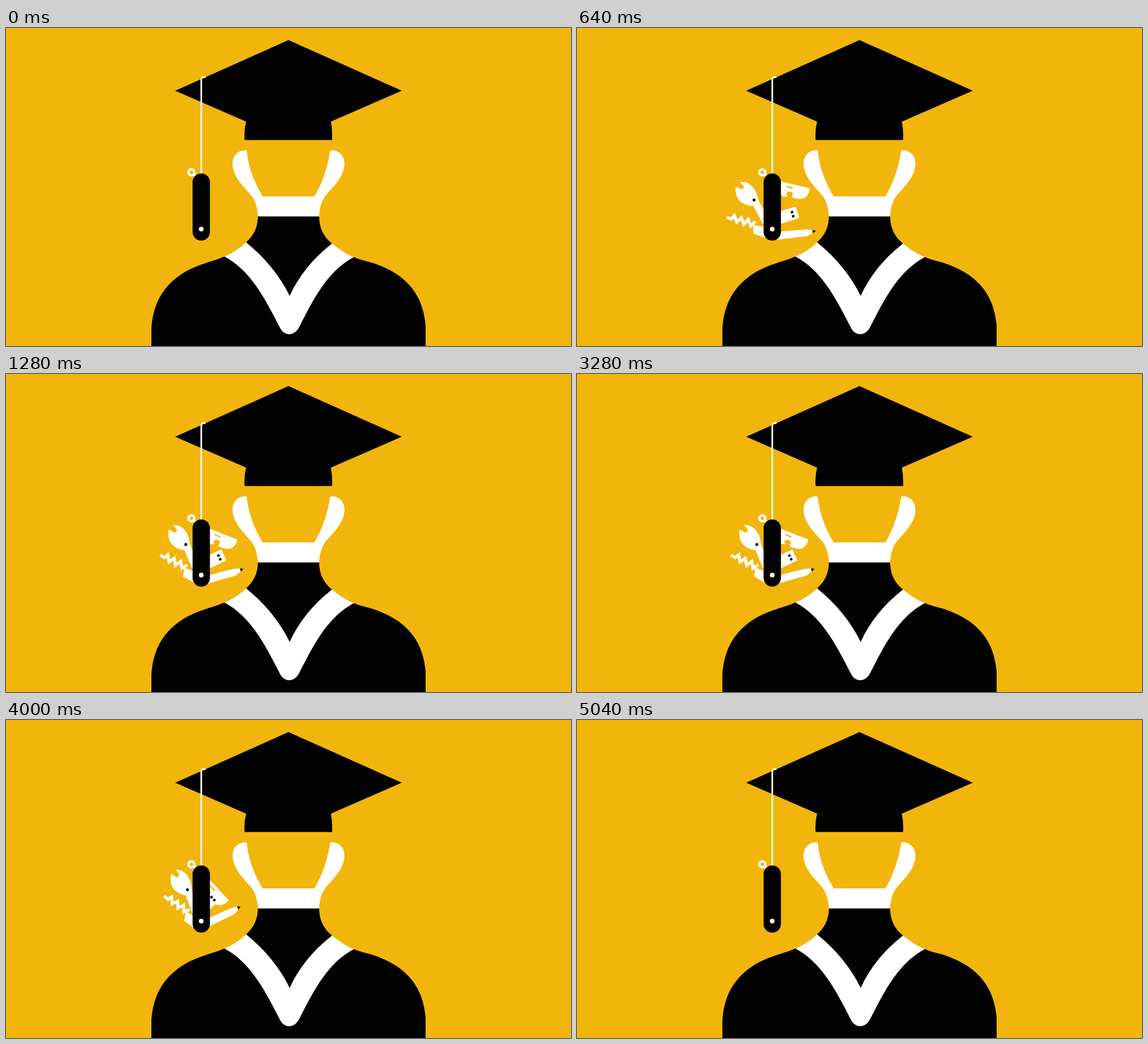
Animation of 960x540 px, one loop 5.54 s. Source, as an HTML page:

```html
<!DOCTYPE html>
<html lang="en">
<head>
<meta charset="utf-8">
<title>Graduate with pocket knife tassel</title>
<style>
  html, body { margin: 0; width: 100%; height: 100%; overflow: hidden; background: #f2b50c; }
  svg { display: block; width: 100%; height: 100%; }
  .w { fill: #fff; }
  .k { fill: #020201; }
  .line { fill: none; stroke: #fff; }
</style>
</head>
<body>
<svg viewBox="0 0 960 540">
  <rect width="960" height="540" fill="#f2b50c"/>

  <!-- gown, neck, collar, head -->
  <path class="k" d="M371 388C360 393 348 396 340 399C300 411 250 440 247 512V540H713V505C708 440 665 412 620 398C610 395 600 393 591 389Z"/>
  <path class="k" d="M428 319H532C532 340 540 355 554 366L482 458L408 364C420 353 428 340 428 319Z"/>
  <path class="w" d="M408 364C440 390 465 420 482 455C498 420 523 390 554 366C565 375 578 384 591 389C548 412 525 455 498 508C490 524 472 524 465 508C438 455 414 411 371 388C385 382 398 374 408 364Z"/>
  <path class="w" d="M409 208C396 206 384 216 385 232C386 252 402 268 413 280C421 288 427 300 428 320H532C533 300 539 288 547 280C558 268 574 252 575 232C576 216 564 206 551 208C546 238 538 262 524 286H436C422 262 412 238 409 208Z"/>

  <!-- cap -->
  <path class="k" d="M480 20.500L672.500 106.500L552 159Q555 174 554 190.300H405.500Q404 174 408 159L287.500 106.500Z"/>
  <path class="line" style="stroke:#fffbe8" stroke-width="2.800" d="M339 83.500H335.500Q331.800 83.500 331.800 88V250"/>

  <!-- tools, drawn in their resting pose -->
  <g id="blade">
    <path class="w" d="M331 257L393 281C391 291 384 298 375 297L364 294L361 291L364 285L358 281L352 284L354 289L347 289L333 275Z"/>
    <path d="M354 272.500L364.500 277" stroke="#f2b50c" stroke-width="2.400"/>
  </g>
  <g id="stick">
    <path class="w" d="M366 298L374.500 316.500L340 333L331 314Z"/>
    <g transform="rotate(-25 362.500 311.500)">
      <path class="k" d="M360.500 306h4v4h-4zM360.500 313h4v4h-4z"/>
    </g>
  </g>
  <g id="pencil">
    <path class="w" d="M331 345L386 331L398 330L399 335L391 342L331 359Z"/>
    <path class="k" d="M397.500 330L403.500 331L399 335.500Z"/>
  </g>
  <g id="corkscrew">
    <path class="line" stroke-width="5" d="M262 307.500L269 312L275 307L277 319L286 313L288 325L297 318L299 330L308 324"/>
    <path class="w" d="M303 329L322 336V356L301 344Z"/>
  </g>
  <g id="wrench">
    <path class="w" d="M277 264L287 270L291 265L284 257C297 255 308 266 311 280L313 290L331 335L318 334L303 299C290 299 276 288 276 274C275.500 270 276 267 277 264Z"/>
    <circle class="k" cx="305.500" cy="289.500" r="2.500"/>
  </g>

  <!-- knife handle -->
  <circle class="line" cx="315" cy="245" r="5" stroke-width="4"/>
  <path class="w" d="M317 248L323 248L321 253L318 251Z"/>
  <rect class="k" x="317" y="247" width="29.500" height="114" rx="14.750"/>
  <circle class="w" cx="331.700" cy="341.500" r="4"/>
</svg>
<script>
const LOOP = 5540, STEP = 80;

// pivot, angle when folded, angle at the overshoot, folding time span
const tools = [
  { id: 'blade',     x: 331.5, y: 261,   shut: 58,  over: -8.3,  from: 3520, to: 4560 },
  { id: 'stick',     x: 331.5, y: 341.5, shut: -50, over: 8,     from: 3520, to: 4700 },
  { id: 'pencil',    x: 320,   y: 352,   shut: -68, over: 9.3,   from: 3840, to: 4500 },
  { id: 'corkscrew', x: 328,   y: 352,   shut: 58,  over: -11.4, from: 3700, to: 5000 },
  { id: 'wrench',    x: 331.5, y: 341.5, shut: 27,  over: -5.3,  from: 3840, to: 4600 }
];
for (const tool of tools) tool.el = document.getElementById(tool.id);

function ease(t, from, to) {
  const u = Math.min(1, Math.max(0, (t - from) / (to - from)));
  return u * u * (3 - 2 * u);
}

function angleAt(tool, t) {
  const { shut, over, from, to } = tool;
  if (t < 640) return shut + (over - shut) * ease(t, 0, 640);
  if (t < 1280) return over * (1 - ease(t, 640, 1120));
  return shut * ease(t, from, to);
}

function draw(now) {
  const t = Math.floor((now % LOOP) / STEP) * STEP;
  for (const tool of tools) {
    const angle = angleAt(tool, t);
    const folded = angle / tool.shut > 0.96;
    tool.el.setAttribute('visibility', folded ? 'hidden' : 'visible');
    tool.el.setAttribute('transform', `rotate(${angle} ${tool.x} ${tool.y})`);
  }
}

const start = performance.now();
function tick() {
  draw(performance.now() - start);
  requestAnimationFrame(tick);
}
tick();
</script>
</body>
</html>
```
